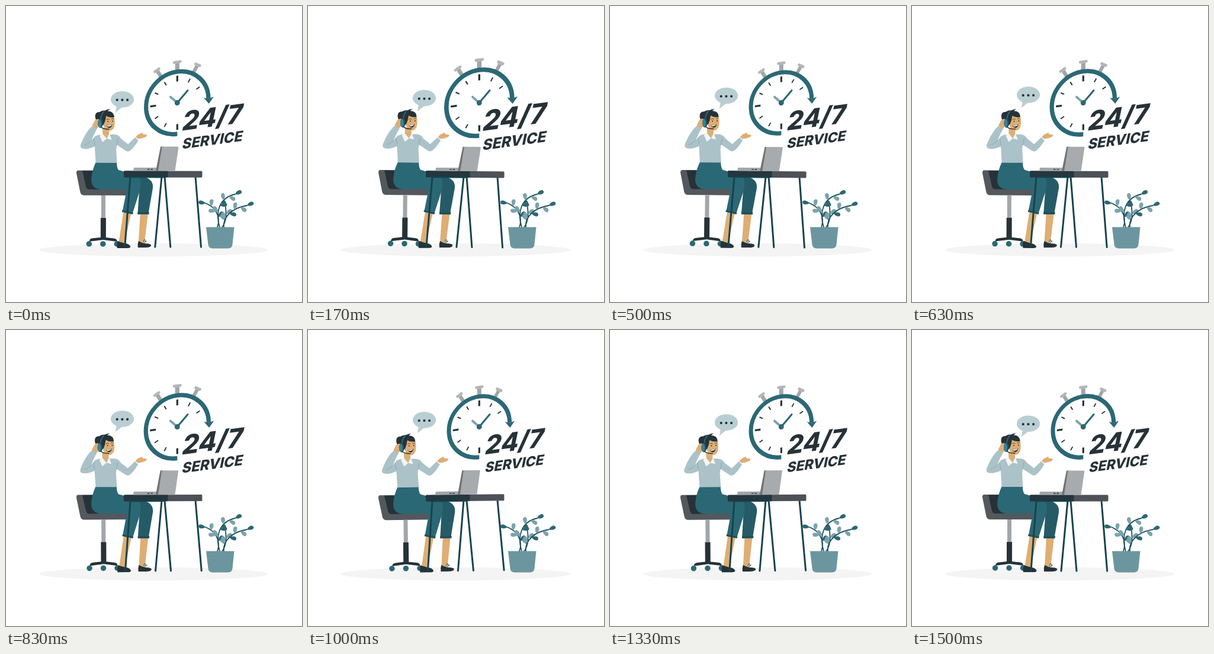
An HTML page for the animation above (1540 ms loop, 500x500 px).

```html
<!DOCTYPE html>
<html lang="en">
<head>
<meta charset="utf-8">
<title>24/7 service</title>
<style>
  html, body { margin: 0; height: 100%; overflow: hidden; background: #fff; }
  svg { display: block; width: 100%; height: 100%; }
  text { font: 800 43px Inter, "Open Sans", sans-serif; }
  .line { fill: none; stroke-linecap: round; }
  .teal { fill: #2b6875; }
  .dark { fill: #263238; }
  .skin { fill: #deae74; }
  .shirt { fill: #abc2c8; }
  .grey { fill: #a3a6a9; }
</style>
</head>
<body>
<svg viewBox="0 0 500 500">
  <defs>
    <path id="leaf" d="M0 0C-4 -4 -6 -13 0 -14S5 -5 0 0Z"/>
    <g id="button">
      <path class="grey" d="M-3.5 -65H3.5V-54H-3.5Z"/>
      <path class="line" stroke="#b3b6b8" stroke-width="4.5" d="M-5 -67H5"/>
    </g>
  </defs>

  <ellipse cx="249.5" cy="412" rx="193.5" ry="11" fill="#f4f4f4"/>

  <g id="plant"></g>
  <path fill="#6c969f" d="M338 373.500H385.500L382.500 403Q381.500 409.500 375 409.500H349Q342.500 409.500 341.500 403Z"/>

  <!-- the clock face lies on a plane slanted upwards -->
  <g transform="translate(289.3 163.500) skewY(-7.6)">
    <g id="clock">
      <use href="#button"/>
      <use href="#button" transform="rotate(-30) scale(.85 1)"/>
      <use href="#button" transform="rotate(30) scale(.85 1)"/>
      <path fill="none" stroke="#2b6875" stroke-width="7" d="M0 51.300A51.300 51.300 0 1 1 51.300 0"/>
      <path class="teal" d="M43.500 -2.500L51.500 0 60 -2 52 8.500Z"/>
      <g id="ticks" stroke="#263238"></g>
    </g>
    <path class="line" stroke="#7ba2ab" stroke-width="3.6" d="M0 0L-11.500 -11.500"/>
    <path class="line" stroke="#2b6875" stroke-width="3.3" d="M0 0L17.500 -18.500"/>
    <circle class="teal" r="4.4"/>
  </g>

  <g id="label" class="dark">
    <text transform="translate(297 210.500) skewY(-7.6) skewX(-12)">24/7</text>
    <text transform="translate(298 240.500) skewY(-7.6) skewX(-12)" style="font-size:23px">SERVICE</text>
  </g>

  <g id="desk">
    <!-- chair -->
    <path fill="#53585d" d="M122 278H152V309H206V320H132Q127 320 125.500 315L119 283Q118.500 278 122 278Z"/>
    <path class="dark" d="M129 278.500H160V310H141Q136 310 135 305Z"/>
    <path class="grey" d="M161 320H168V359H161Z"/>
    <path class="dark" d="M160 358H169V391L182 392.500Q188 393 188 398L164.500 395 141 398Q141 393 147 392.500L160 391Z"/>
    <path class="line" stroke="#2b6875" stroke-width="9.5" stroke-dasharray="0 23.500" d="M140.500 402H188"/>

    <!-- legs -->
    <path class="skin" d="M199 345L212 348 200 402 190.500 400ZM227 349L240 350 234 402 224 400Z"/>
    <path class="dark" d="M189 397Q194 399 200 400.500Q210 402 210.500 407Q210 409 205 409H188Q187 402 189 397ZM224 397Q229 400 234 401Q244 401 245.500 404Q245 408 236 408H223Q222 402 224 397Z"/>
    <path class="line" stroke="#2b6875" d="M232 398Q235 391 235.500 398Q240 395 234 400"/>
    <path fill="#255b67" d="M200 288H232Q250 293 248 308L240.500 351H222.500L226 300Z"/>
    <path class="teal" d="M151.500 264.500H187Q187 273 190 277L222 286Q230 293 226 312L214 350 197 346 204 310H160Q144 309 144 293Q145 278 151.500 264.500Z"/>
    <path fill="#1f505c" d="M196.500 345L215 349 214 352 196 348ZM222.500 348H242L241.500 352H222.500Z"/>

    <!-- arms and torso -->
    <path class="shirt" d="M147 202L154 207Q148 217 144.500 227L151 220 153 236Q138 244 128.500 241Q124 239 126.500 233Q136 210 147 202Z"/>
    <path class="shirt" d="M148 223Q150 218 161 217L179 217Q190 216 194 224L206 233.500 218 222 223.500 227Q216 240 208.500 245Q204.500 247 200 243L187 234.500 186 242 187.500 265H151.500L150 240Z"/>
    <path class="line" stroke="#879fa6" stroke-width=".8" d="M144 228Q138 234 133 235M150 235L148 224M187 235L189 224"/>
    <path class="skin" d="M163 206H174V219L170 224 163 218Z"/>
    <path fill="#f1f6f7" d="M162.500 215L170 224 163 230 158 219ZM174.500 215L178.500 226 170 224Z"/>
    <path class="skin" d="M219 221.500Q223 216 227 215.500L230 213.500 231 216.500 237.500 217.500Q239 219 235.500 221.500Q230 224 223 224.500Z"/>

    <!-- head -->
    <path class="skin" d="M165 185H182Q185 196 182.500 205Q179 212 173 210.500Q166 208 163.500 200Z"/>
    <path class="dark" d="M150.500 188Q149.500 179 158 179Q164 175 172 177.500Q182.500 178 182.500 188Q174 189 169 185.500Q168 194 165 200L160 203Q152 197 150.500 188ZM166 178Q170 174 176 174.500Q172 176 171 179Z"/>
    <path class="skin" d="M145.500 202L150 193.500Q153 190 157.500 191.500L159 195 155 206 152 207Z"/>
    <path class="line" stroke="#2b6875" stroke-width="2" d="M160 192Q160 184 165 178.500"/>
    <ellipse cx="159.300" cy="198" rx="4.300" ry="8" fill="#1f4f5d"/>
    <ellipse cx="158" cy="198.500" rx="3" ry="7" fill="#3a8195"/>
    <path class="line" stroke="#263238" stroke-width="1.400" d="M161 205Q165 208.500 174 208"/>
    <path class="line" stroke="#263238" stroke-width="2" stroke-dasharray="0 8" d="M172 195L180.500 194.500"/>
    <path class="dark" d="M169.500 201.500Q174 202.500 179.500 200Q178 206 174.500 206Q170.500 205.500 169.500 201.500Z"/>
    <path fill="#fff" d="M170 201.800Q174 202.500 179 200.500Q176 204.500 171 203.500Z"/>
    <path class="line" stroke="#263238" stroke-width=".8" d="M169.500 192Q171.500 190 174 191.500M178 191Q180 189.500 181.500 191"/>

    <!-- table and laptop -->
    <path class="line" stroke="#16434e" stroke-width="3" d="M210 288L201 407M263 288L252 407M268 288L278 407M320 288L329.700 407"/>
    <rect x="199" y="278.500" width="132.500" height="11" rx="1.500" fill="#4c5258"/>
    <rect x="199" y="278.500" width="74.500" height="11" rx="1.500" fill="#24363e"/>
    <path fill="#16434e" d="M208 288H269V290.300H208Z"/>
    <path class="grey" d="M216 273H256V278.500H215Z"/>
    <path stroke="#263238" stroke-width="1.400" stroke-dasharray="3.500 2" d="M239 276H248"/>
    <path fill="#6f7377" d="M261 237.500H266L259 278.500H253Z"/>
    <path fill="#a8abad" d="M263.500 237.500H290Q291.500 237.500 291.300 239L285.500 278.500H257Z"/>
  </g>

  <g id="bubble">
    <path fill="#b9ced2" d="M187 168L184.700 180.500 198 170Z"/>
    <ellipse cx="196.500" cy="158.200" rx="19.600" ry="13.800" fill="#b9ced2"/>
    <path class="line" stroke="#263238" stroke-width="4.200" stroke-dasharray="0 8.700" d="M187.700 159.200H206"/>
  </g>
</svg>
<script>
  const LOOP = 1540, LEAD = 40;
  const $ = id => document.getElementById(id);
  const add = (parent, tag, attributes) => {
    const node = document.createElementNS('http://www.w3.org/2000/svg', tag);
    for (const name in attributes) node.setAttribute(name, attributes[name]);
    return parent.appendChild(node);
  };

  // Hour ticks from six o'clock round to two, longer on the quarters
  for (let angle = 180; angle <= 420; angle += 30) {
    if (angle === 450) continue;
    const quarter = angle % 90 === 0;
    add($('ticks'), 'path', {
      d: quarter ? 'M0 -35V-44.500' : 'M0 -36V-42.500',
      'stroke-width': quarter ? 3.1 : 1.9,
      transform: `rotate(${angle})`
    });
  }

  // Leaves sit along each stem in turn left and right, the last one on its tip
  const stems = [
    'M357 374C364 354 352 339 337 333',
    'M365 374C373 362 372 352 371 340',
    'M361 374C353 348 360 324 387 318',
    'M368 374C366 356 382 341 407 337'
  ];
  const SPACING = 11;
  for (const d of stems) {
    const stem = add($('plant'), 'path', { d, class: 'line', stroke: '#1d4d59', 'stroke-width': 1.8 });
    const length = stem.getTotalLength();
    const count = Math.floor(length * .75 / SPACING);
    for (let i = 0; i <= count; i++) {
      const at = length - i * SPACING;
      const { x, y } = stem.getPointAtLength(at);
      const before = stem.getPointAtLength(at - 1);
      const heading = Math.atan2(y - before.y, x - before.x) * 180 / Math.PI + 90;
      const turn = i === 0 ? -15 : i % 2 ? 55 : -55;
      add($('plant'), 'use', {
        href: '#leaf',
        fill: i % 3 ? '#7ba4ac' : '#2b6875',
        transform: `translate(${x} ${y}) rotate(${heading + turn}) scale(.85)`
      });
    }
  }

  // Rises quickly and falls slowly, twice per loop, then rests
  const pulse = p => Math.max(0, Math.min(p / .1, (.3 - p) / .2));
  const secondPulse = p => Math.max(0, 1 - Math.abs(p - .5) / .1);
  // Triangle wave from 0 up to 1 and back
  const triangle = p => 1 - Math.abs(1 - 2 * (p - Math.floor(p)));
  const move = (id, transform) => $(id).setAttribute('transform', transform);

  function draw(time) {
    const p = (time + LEAD) % LOOP / LOOP;
    const beat = 1 + .1 * (pulse(p) + secondPulse(p));
    move('clock', `scale(${beat})`);
    move('label', `translate(350 202) scale(${beat}) translate(-350 -202)`);
    move('desk', `rotate(${2 * triangle(p + .25) - 1} 225 291)`);
    move('bubble', `translate(0 ${-9.5 * triangle(p)})`);
  }

  const start = performance.now();
  function tick() {
    draw(performance.now() - start);
    requestAnimationFrame(tick);
  }
  tick();
</script>
</body>
</html>
```
